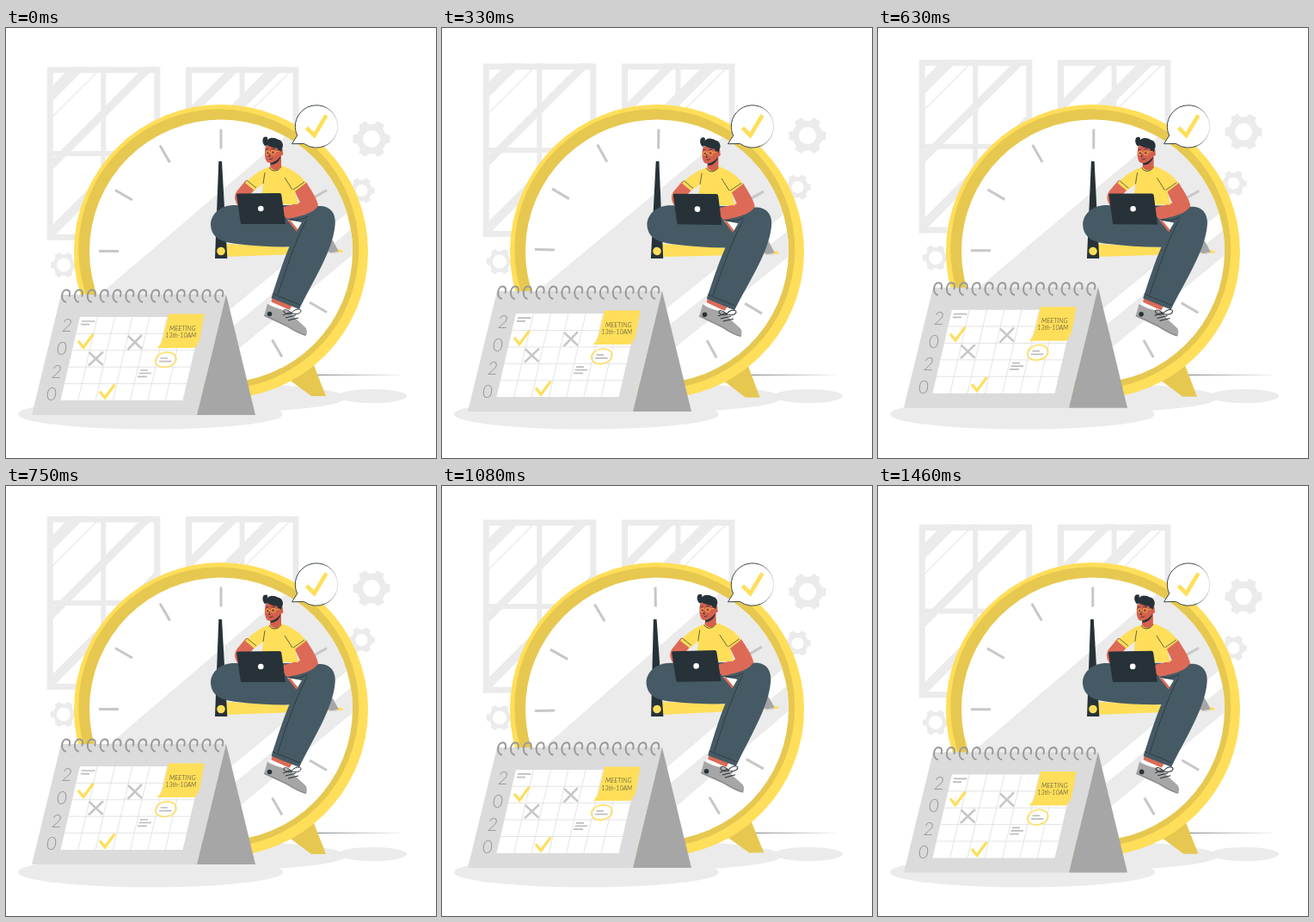
Write an HTML page with a canvas that moves like this. It is 500 by 500 pixels and loops after 1500 ms.

```html
<!DOCTYPE html>
<html lang="en">
<head>
<meta charset="utf-8">
<title>Time management</title>
<style>
html, body { margin: 0; width: 100%; height: 100%; overflow: hidden; background: #fff; }
canvas { display: block; width: 500px; height: 500px; }
</style>
</head>
<body>
<canvas id="stage" width="500" height="500"></canvas>
<script>
const ctx = document.getElementById('stage').getContext('2d');
const LOOP = 1500, FPS = 24, TAU = Math.PI * 2;
const CX = 250, CY = 259.5;
const YELLOW = '#ffde59', GOLD = '#e6c850', DARK = '#263238', PALE = '#ebebeb',
      SKIN = '#dd6a57', FACE = '#d4604d', SLATE = '#455a64', GRAY = '#a6a6a6', MARK = '#c7c7c7';

function fill(path, color) {
  ctx.fillStyle = color;
  ctx.fill(new Path2D(path));
}

function stroke(path, color, width) {
  ctx.strokeStyle = color;
  ctx.lineWidth = width;
  ctx.stroke(new Path2D(path));
}

function ellipse(x, y, rx, ry, color) {
  ctx.beginPath();
  ctx.ellipse(x, y, rx, ry, 0, 0, TAU);
  ctx.fillStyle = color;
  ctx.fill();
}

const disc = (x, y, r, color) => ellipse(x, y, r, r, color);

function grouped(draw) {
  ctx.save();
  draw();
  ctx.restore();
}

// Diagonal glass reflection covering from <= x + y <= to.
function glint(from, to) {
  fill(`M${from} 0L${to} 0L${to - 400} 400L${from - 400} 400Z`, PALE);
}

function drawWindow(x, glints) {
  const y = 45, w = 131.5, h = 202;
  grouped(() => {
    ctx.beginPath();
    ctx.rect(x, y, w, h);
    ctx.clip();
    glints.forEach(([from, to]) => glint(from, to));
  });
  ctx.strokeStyle = PALE;
  ctx.lineWidth = 7;
  ctx.strokeRect(x + 3.5, y + 3.8, w - 7, h - 7.5);
  stroke(`M${x + 65.5} ${y}V${y + h}M${x} 146H${x + w}`, PALE, 6);
}

function drawGear(x, y, r, hole) {
  const teeth = 6;
  ctx.beginPath();
  for (let i = 0; i < teeth; i++) {
    const mid = i * TAU / teeth;
    [[-0.33, 0.8], [-0.2, 1], [0.2, 1], [0.33, 0.8]].forEach(([da, k]) =>
      ctx.lineTo(x + r * k * Math.cos(mid + da), y + r * k * Math.sin(mid + da)));
  }
  ctx.closePath();
  ctx.moveTo(x + hole, y);
  ctx.arc(x, y, hole, 0, TAU);
  ctx.fillStyle = PALE;
  ctx.fill('evenodd');
}

function drawBackdrop() {
  drawWindow(47.8, [[121, 139], [156, 158], [206, 219], [283, 298]]);
  drawWindow(209, [[306, 320], [352, 370], [380, 382]]);
  drawGear(425, 129, 22, 10);
  drawGear(413.5, 189, 15.5, 7);
  drawGear(67, 275.5, 15.5, 8);
}

function drawFloor() {
  fill('M37 403.6Q250 402.7 464 403.6Q250 404.7 37 403.6Z', DARK);
  ellipse(240, 430, 155, 17, PALE);
  ellipse(426, 428, 40, 8, PALE);
  ellipse(168, 449, 154, 17.5, PALE);
}

function drawClock() {
  fill('M328 408L358 392L372 428H355Z', GOLD);
  disc(250, 260, 171, YELLOW);
  disc(247.3, 257.3, 163, GOLD);
  disc(250, 259.5, 153, '#fff');

  grouped(() => {
    ctx.beginPath();
    ctx.arc(250, 259.5, 153, 0, TAU);
    ctx.clip();
    fill('M335 117L90 326V440L256 331L405 208V100Z', PALE);
    fill('M405 231L256 353V385L405 262Z', PALE);
  });

  for (let i = 0; i < 12; i++) {
    if (i === 3) continue;
    const s = Math.sin(i * TAU / 12), c = -Math.cos(i * TAU / 12);
    stroke(`M${CX + 119 * s} ${CY + 119 * c}L${CX + 142 * s} ${CY + 142 * c}`, MARK, 3);
  }

  fill('M256 251L386 257.5Q392 258 392 259.5Q392 261 386 261.3L256 266Z', YELLOW);
  fill('M247.3 155H251L257.3 268H243Z', DARK);
  disc(250, 259.5, 4.8, YELLOW);
}

function drawLegs() {
  // Far foot
  fill('M372 244L380 247L387 260Q384 263 376 261L366 256Z', GRAY);
  stroke('M368 258L378 262L387 260', '#dbdbdb', 1.2);
  // Crossed leg
  fill('M268 206C250 205 238 216 238 229C239 244 250 249 268 251C292 254 318 255 340 254L352 222L330 206Z', SLATE);
  fill('M327 223L345 226L341 237Z', '#fff');
  fill('M327 223L331 224L340 235L338 237Z', SKIN);
  // Hanging leg
  fill('M310 312L333 322L329 329L308 320Z', SKIN);
  fill('M307.5 318L330 328L329 331L306 321Z', '#fff');
  fill('M324 209C340 210 352 207 366 207C380 208 385 219 382 234C378 262 356 296 341 327L308.5 314C316 292 326 255 344 226L326 221Z', SLATE);
  stroke('M350 222C336 248 325 283 316 310M310 309L342 322', DARK, 0.7);
  stroke('M329 222C339 225 345 222 351 219', DARK, 0.8);
}

function drawShoe() {
  fill('M304 320.5C313 327 322 327 330 330L337 338L348 348Q351 351 349 358Q342 357 326 347L300 335Z', GRAY);
  stroke('M300.5 334L326 346Q340 355 348.5 357', '#8c8c8c', 1.4);
  disc(306.5, 332.5, 2.8, DARK);
  stroke('M322 334L332 330M325 337L337 334M328 340L340 337', DARK, 1);
  stroke('M332 332C335 326 343 326 343 329C342 333 336 333 332 332C327 326 322 327 323 330C325 333 329 333 332 332', DARK, 1);
}

function drawTorso() {
  // Arms
  fill('M279 177L290 187L281 197L285 207H270C265 200 265 194 269 189Z', SKIN);
  fill('M335 188L349 179C355 189 361 197 363 206C359 215 343 219 327 222L321 216L323 208L342 203Z', SKIN);
  // Shirt
  fill('M305 162C298 164 288 170 278 180L289 189L299 181L296 205H340L336 190L349 180C341 169 332 164 320 160Z', YELLOW);
  stroke('M280 177L291 186M334 188L347 179M301 168L299 181M324 174L333 188', DARK, 0.7);
  stroke('M306 162C309 168 317 167 320 161', DARK, 0.8);
  // Laptop
  fill('M269.5 192.5L318 192Q320 192 320.3 194L325 228H274Q273 228 272.7 226L268 194Q268 192.5 269.5 192.5Z', DARK);
  disc(296.3, 210, 3.3, '#fff');
}

function drawHead() {
  fill('M308 151L320 145L320 161C317 167 309 166 307 161Z', FACE);
  fill('M307 156Q314 156 319 149L319 151.5Q315 159 308 159Z', DARK);
  fill('M302 137C300 145 301 154 304 156C308 158.5 315 155 319 149L322 143L320 135Z', FACE);
  fill('M301 137C297 133 298 126 302 126.5C304 126 304.5 128 304 130C308 126 314 128 316 129.5C321 130 323.5 136 321 140L320 144L317 143L315 139.5C311 140 306 137 304 136.5Z', DARK);
  disc(320, 146, 2.4, FACE);
  ctx.strokeStyle = '#f2b445';
  ctx.lineWidth = 0.8;
  [[304.5, 145.2, 2.2], [310.7, 144.8, 2.6]].forEach(([x, y, r]) => {
    ctx.beginPath();
    ctx.arc(x, y, r, 0, TAU);
    ctx.stroke();
    disc(x - 0.3, y, 0.75, DARK);
  });
  stroke('M313 144L319 143', '#f2b445', 0.8);
  stroke('M302 141.3L305 140.6M308.5 140.8L313 140.6M306.5 146L305.5 149.5H307.5M306 152.5Q309 153 310.5 151.3', DARK, 0.8);
}

function drawHook(x) {
  stroke(`M${x + 1} 318.8C${x - 6} 318 ${x - 5} 305 ${x + 1} 304.5C${x + 5} 304.2 ${x + 6} 308 ${x + 4.5} 312.5`, '#999', 2);
}

function label(text, x, y, size, color) {
  ctx.font = `italic 300 ${size}px Lato, sans-serif`;
  ctx.textAlign = 'center';
  ctx.textBaseline = 'alphabetic';
  ctx.fillStyle = color;
  ctx.fillText(text, x, y);
}

function drawCalendar() {
  fill('M64 310H256L222 450H30Z', '#dbdbdb');
  fill('M256 310L290 450H222Z', GRAY);

  const top = 336, bottom = 433, slant = -22.5, left = 86, width = 142;
  fill(`M${left} ${top}h${width}L${left + width + slant} ${bottom}h${-width}Z`, '#fff');
  for (let i = 1; i < 7; i++) {
    stroke(`M${left + i * width / 7} ${top}l${slant} ${bottom - top}`, '#e0e0e0', 0.9);
  }
  for (let i = 1; i < 5; i++) {
    const k = i / 5;
    stroke(`M${left + slant * k} ${top + (bottom - top) * k}h${width}`, '#e0e0e0', 0.9);
  }

  for (let i = 0; i < 13; i++) drawHook(69 + i * 14.85);
  ['2', '0', '2', '0'].forEach((digit, i) =>
    label(digit, 71 - i * 6, 353.3 + i * 26.7, 22, '#999'));

  stroke('M88 341H103.5M87 344.7H97M179.5 384H188M178 387.7H192.5M156 398H165M154.5 401.5H169M153 405.3H164', '#bdbdbd', 1.7);
  stroke('M142 358L158 373M158 357L141.5 374M96.5 377L112.5 392M113 376.5L96 392.5', MARK, 2.6);
  stroke('M84 364L90 371.5L101.5 356M109 422.5L115 430L126.5 414.5', YELLOW, 3.2);
  ctx.beginPath();
  ctx.ellipse(185.8, 385.7, 12.2, 8.6, -0.2, 0, TAU);
  ctx.strokeStyle = YELLOW;
  ctx.lineWidth = 1.5;
  ctx.stroke();

  fill('M189 332.5H230.5L226 358Q224 368 219 372H175.5Q180.5 368 182.5 360Z', YELLOW);
  label('MEETING', 205.2, 351.5, 7.5, DARK);
  label('13th-10AM', 203.2, 359.8, 7.2, DARK);
}

function drawBubble() {
  const fade = ctx.createLinearGradient(336, 0, 386, 0);
  fade.addColorStop(0, DARK);
  fade.addColorStop(0.65, DARK);
  fade.addColorStop(1, 'rgba(38,50,56,.15)');
  ctx.beginPath();
  ctx.arc(361, 114.5, 24.7, 2.7, 2.2 + TAU);
  ctx.lineTo(332.5, 134.7);
  ctx.closePath();
  ctx.fillStyle = '#fff';
  ctx.fill();
  ctx.strokeStyle = fade;
  ctx.lineWidth = 0.9;
  ctx.stroke();
  stroke('M349.5 116L358.5 125L372.5 101.5', YELLOW, 4.6);
}

// Triangle wave: 0 at the ends of the loop, 1 halfway.
const rise = p => 1 - Math.abs(1 - 2 * p);
// Linear swing: 0, +1 at a quarter, -1 at three quarters.
const swing = p => p < 0.25 ? 4 * p : p < 0.75 ? 2 - 4 * p : 4 * p - 4;

function render(now) {
  const step = Math.floor((now % LOOP) * FPS / 1000);
  const phase = step / (LOOP * FPS / 1000);
  const lift = -10 * rise(phase);
  const angle = swing(phase) * Math.PI / 180;

  ctx.fillStyle = '#fff';
  ctx.fillRect(0, 0, 500, 500);

  grouped(() => {
    ctx.translate(0, lift);
    drawBackdrop();
  });
  drawFloor();
  grouped(() => {
    ctx.translate(CX, CY);
    ctx.rotate(angle);
    ctx.translate(-CX, -CY);
    drawClock();
    drawLegs();
    drawShoe();
    drawTorso();
    drawHead();
  });
  grouped(() => {
    ctx.translate(0, lift);
    drawCalendar();
  });
  drawBubble();
}

function tick() {
  render(performance.now());
  requestAnimationFrame(tick);
}
tick();
</script>
</body>
</html>
```
